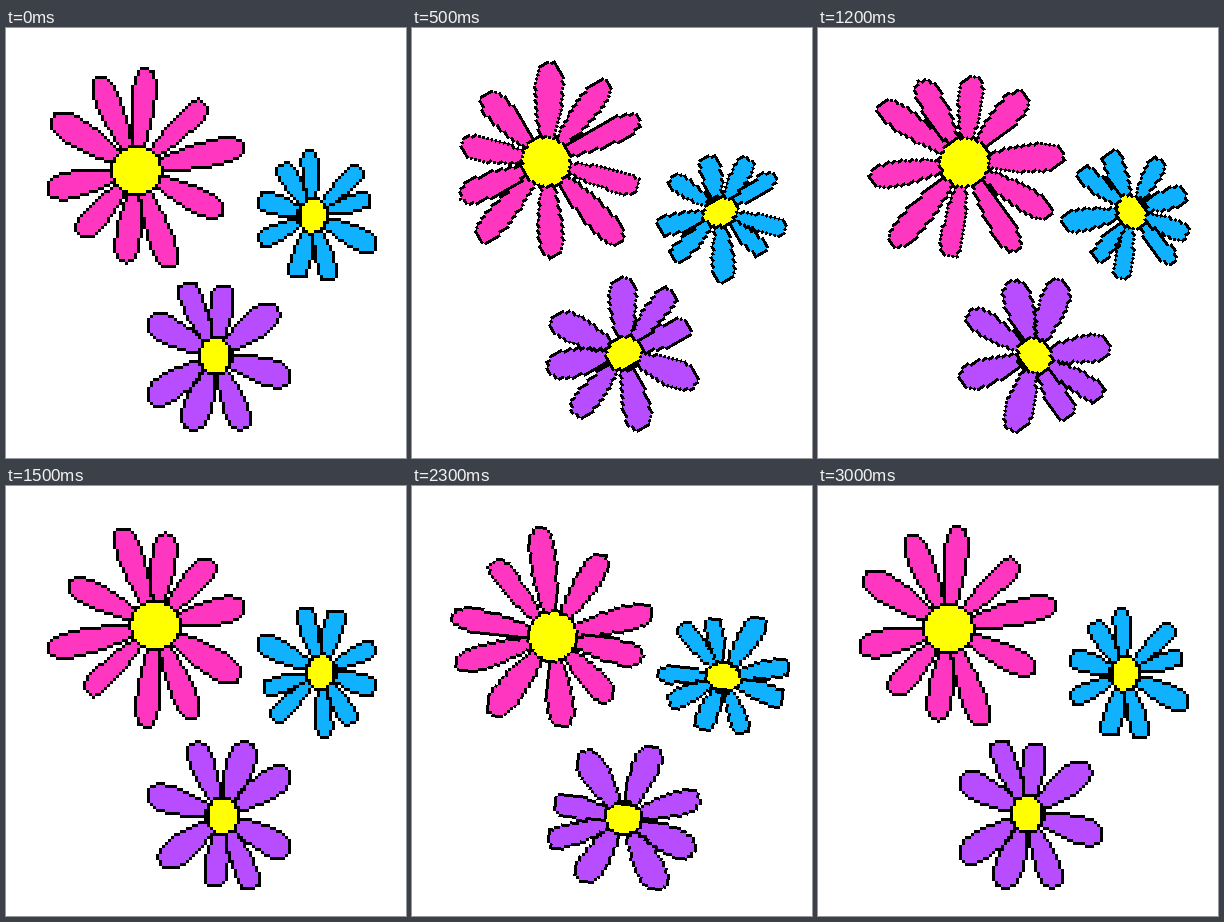
Animation of 400 by 430 pixels, one loop 3.05 s. Source, as an HTML page with a canvas:

```html
<!DOCTYPE html>
<html>
<head>
<meta charset="utf-8">
<style>
html, body { margin: 0; width: 100%; height: 100%; overflow: hidden; background: #fff; }
canvas { display: block; }
</style>
</head>
<body>
<canvas id="stage" width="400" height="430"></canvas>
<script>
const CELL = 3, GRID = 76, LOOP = 3050, STEP = 100, TURN = Math.PI / 15;
const BLUNT = 5;

// Petals: tip x, tip y, half width, optional tip squareness
const flowers = [
  { color: '#ff36bf', pivot: [140.3, 140.5], disc: [131, 142, 26, 26, 0], petals: [
    [141, 39, 13], [199, 75, 11.5, BLUNT], [239, 117, 14], [218, 185, 13.5], [166, 240, 13.5],
    [119, 235, 13.5], [73, 208, 13], [41, 162, 14.5], [46, 88, 15], [92, 48, 13]] },
  { color: '#b84dff', pivot: [212.6, 328.7], disc: [209, 328, 17, 20, 0], petals: [
    [218, 256, 13], [271, 279, 15], [285, 351, 14.5], [238, 402, 13],
    [183, 402, 15], [142, 373, 15], [142, 291, 14.5], [178, 255, 12, BLUNT]] },
  { color: '#10b2ff', pivot: [311, 187], disc: [307, 188, 15, 19, 0.25], petals: [
    [303, 121, 9.5, 3], [355, 140, 9.5, BLUNT], [365, 170, 9.5, BLUNT], [371, 220, 12], [325, 253, 10.5, BLUNT],
    [290, 250, 11, BLUNT], [252, 214, 10, 3], [252, 171, 11.5, 3], [275, 136, 10.5, 3]] },
];

function petalShape([cx, cy, rx, ry], [tipX, tipY, width, power = 2.4]) {
  const dx = tipX - cx, dy = tipY - cy, length = Math.hypot(dx, dy);
  const start = (rx + ry) * 0.42, widest = 0.66;
  return (x, y) => {
    const along = ((x - cx) * dx + (y - cy) * dy) / length;
    const across = Math.abs((y - cy) * dx - (x - cx) * dy) / length;
    const t = (along - start) / (length - start);
    if (t < 0 || t > 1) return false;
    const profile = t < widest
      ? 0.52 + 0.48 * Math.sin(t / widest * Math.PI / 2)
      : (1 - ((t - widest) / (1 - widest)) ** power) ** (1 / power);
    return across < width * profile;
  };
}

function discShape([cx, cy, rx, ry, tilt]) {
  const c = Math.cos(tilt), s = Math.sin(tilt);
  return (x, y) => {
    const dx = x - cx, dy = y - cy;
    return Math.hypot((dx * c + dy * s) / rx, (dy * c - dx * s) / ry) < 1;
  };
}

function makeSprite({ color, pivot, disc, petals }) {
  const sprite = document.createElement('canvas');
  sprite.width = sprite.height = GRID;
  const g = sprite.getContext('2d');
  const leaves = petals.map(p => petalShape(disc, p)), heart = discShape(disc);
  const isEdge = (inside, x, y) => !(inside(x - CELL, y) && inside(x + CELL, y) &&
    inside(x, y - CELL) && inside(x, y + CELL));

  for (let row = 0; row < GRID; row++) {
    for (let col = 0; col < GRID; col++) {
      const x = pivot[0] + (col + 0.5 - GRID / 2) * CELL;
      const y = pivot[1] + (row + 0.5 - GRID / 2) * CELL;
      const inHeart = heart(x, y);
      const hits = inHeart ? [heart] : leaves.filter(inside => inside(x, y));
      if (!hits.length) continue;
      g.fillStyle = hits.some(inside => isEdge(inside, x, y)) ? '#000' : inHeart ? '#ff0' : color;
      g.fillRect(col, row, 1, 1);
    }
  }
  return sprite;
}

const ctx = document.getElementById('stage').getContext('2d');
const sprites = flowers.map(makeSprite);

function draw(now) {
  const angle = Math.floor(now % LOOP / STEP) * TURN;
  ctx.resetTransform();
  ctx.fillStyle = '#fff';
  ctx.fillRect(0, 0, 400, 430);
  ctx.imageSmoothingEnabled = false;
  flowers.forEach(({ pivot }, i) => {
    ctx.setTransform(1, 0, 0, 1, Math.round(pivot[0]), Math.round(pivot[1]));
    ctx.rotate(angle);
    ctx.scale(CELL, CELL);
    ctx.drawImage(sprites[i], -GRID / 2, -GRID / 2);
  });
}

const begin = performance.now();
function tick() {
  draw(performance.now() - begin);
  requestAnimationFrame(tick);
}
tick();
</script>
</body>
</html>
```
